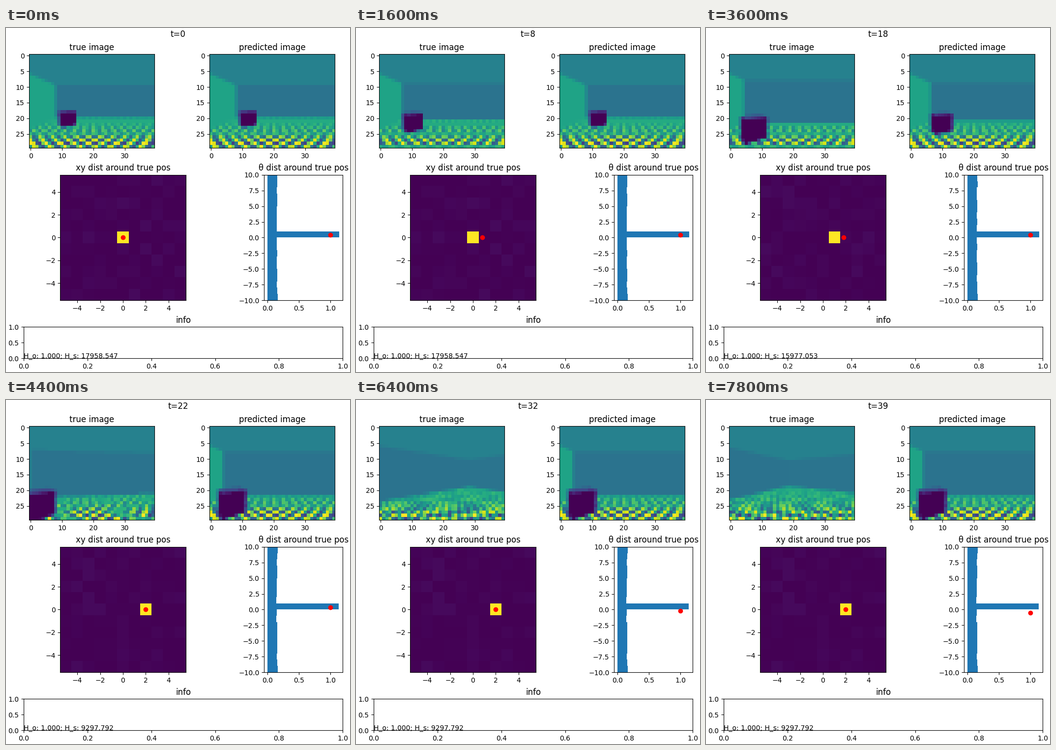
Recreate the animation shown at these times as a matplotlib script. Size 700 by 700 pixels, loop 8000 ms.

```python
import numpy as np
import matplotlib.pyplot as plt
from matplotlib.animation import FuncAnimation

SIZE, STEPS, HOLD = 700, 40, 200
W, H, FOCAL, SUB = 40, 30, 26.0, 4
EYE, CEIL = 1.5, 1.38            # distance from the eye to floor and ceiling
LEFT, RIGHT, FAR = -3.2, 7.5, 7.3
BOX_X, BOX_Z, BOX_HALF, BOX_TOP = -1.55, 5.13, 0.4, 0.65
BOX_TURN = np.radians(40)
TILE = 0.5                       # period of the floor checker
WALK = 20                        # steps forward before turning right


def pose(t):
    """Forward position and heading at step t."""
    return 0.1 * min(t, WALK), np.radians(3) * max(t - WALK, 0)


def rays(n, yaw):
    """World directions for n x n samples in each pixel."""
    u = ((np.arange(W * n) + 0.5) / n - W / 2) / FOCAL
    v = ((np.arange(H * n) + 0.5) / n - H / 2) / FOCAL
    u, v = np.meshgrid(u, v)
    return u * np.cos(yaw) + np.sin(yaw), v, np.cos(yaw) - u * np.sin(yaw)


def slab(pos, d, low, high):
    a, b = (low - pos) / d, (high - pos) / d
    return np.minimum(a, b), np.maximum(a, b)


def floor_shade(z, yaw):
    dx, v, dz = rays(1, yaw)
    depth = EYE / np.maximum(v, 1e-3)
    x, zz = dx * depth, z + dz * depth
    check = np.sin(2 * np.pi * x / TILE) * np.sin(2 * np.pi * zz / TILE)
    fade = np.minimum(1, (2.9 / depth) ** 3)
    return 0.61 + 0.42 * fade * np.clip(1.3 * check, -1, 1)


def view(t):
    z, yaw = pose(t)
    dx, v, dz = rays(SUB, yaw)
    big = 1e6
    with np.errstate(divide="ignore", invalid="ignore"):
        hits = np.stack([
            np.where(dx < 0, LEFT / dx, big),
            np.where(dx > 0, RIGHT / dx, big),
            np.where(dz > 0, (FAR - z) / dz, big),
            np.where(v < 0, -CEIL / v, big),
            np.where(v > 0, EYE / v, big),
        ])
        c, s = np.cos(BOX_TURN), np.sin(BOX_TURN)
        px, pz = -BOX_X, z - BOX_Z
        ax = slab(c * px + s * pz, c * dx + s * dz, -BOX_HALF, BOX_HALF)
        az = slab(c * pz - s * px, c * dz - s * dx, -BOX_HALF, BOX_HALF)
        ay = slab(0, v, BOX_TOP, EYE)
    ground = np.kron(floor_shade(z, yaw), np.ones((SUB, SUB)))
    flat = np.array([0.58, 0.385, 0.38, 0.44, 0])
    near = hits.argmin(0)
    shade = np.where(near == 4, ground, flat[near])

    side = np.maximum(ax[0], az[0])
    enter = np.maximum(side, ay[0])
    leave = np.minimum(np.minimum(ax[1], az[1]), ay[1])
    on_box = (enter < leave) & (enter > 0)
    shade = np.where(on_box, np.where(ay[0] > side, 0.22, 0.0), shade)
    return shade.reshape(H, SUB, W, SUB).mean((1, 3))


def position_map(k):
    rng = np.random.default_rng(5 + k)
    grid = 0.018 * rng.random((11, 11)) ** 2
    grid[rng.integers(0, 11, 8), rng.integers(0, 11, 8)] = 0.024
    grid[5, 5 + k] = 1
    return grid


def heading_bars(k):
    rng = np.random.default_rng(20 + k)
    i = np.arange(20)
    bars = 0.137 + 0.012 * np.abs(i - 9.5) / 9.5 + 0.014 * rng.random(20)
    bars[0] = 0.163
    bars[10] = (1.14, 1.14, 1.133)[k]
    return bars


views = [view(t) for t in range(STEPS)]
maps = [position_map(k) for k in range(3)]
bars = [heading_bars(k) for k in range(3)]
entropy = ("17958.547", "15977.053", "9297.792")

fig = plt.figure(figsize=(SIZE / 100, SIZE / 100), dpi=100)


def panel(x0, y0, x1, y1, title):
    ax = fig.add_axes([x0 / SIZE, 1 - y1 / SIZE, (x1 - x0) / SIZE, (y1 - y0) / SIZE])
    ax.set_title(title)
    return ax


def camera(x0, title):
    ax = panel(x0, 53.1, x0 + 255, 244.3, title)
    im = ax.imshow(views[0], vmin=0, vmax=1, aspect="auto")
    ax.set_xticks(range(0, 40, 10))
    ax.set_yticks(range(0, 30, 5))
    return im


true_im = camera(47.2, "true image")
pred_im = camera(414.2, "predicted image")

ax_xy = panel(110.3, 298.8, 365.6, 554, "xy dist around true pos")
xy_im = ax_xy.imshow(maps[0], vmin=0, vmax=1, origin="lower", aspect="auto",
                     extent=(-5.5, 5.5, -5.5, 5.5))
xy_dot, = ax_xy.plot([0], [0], "ro")
ax_xy.set(xlim=(-5.5, 5.5), ylim=(-5.5, 5.5),
          xticks=range(-4, 5, 2), yticks=range(-4, 5, 2))

ax_th = panel(525.2, 298.8, 685.2, 554, "θ dist around true pos")
th_bars = ax_th.barh(np.arange(-10, 10), bars[0], height=1, align="edge")
th_dot, = ax_th.plot([1], [0.45], "ro")
ax_th.set(xlim=(-0.057, 1.197), ylim=(-10, 10), xticks=(0, 0.5, 1),
          yticks=np.arange(-10, 10.1, 2.5))

ax_info = panel(36.2, 608.2, 685.2, 672.2, "info")
ax_info.set_yticks((0, 0.5, 1))
info = ax_info.text(0, 0, "")
clock = fig.text(0.5, 1 - 4.17 / SIZE, "", ha="center", va="top", fontsize=12)


def draw(t):
    k = min(t // 10, 2)
    z, yaw = pose(t)
    clock.set_text(f"t={t}")
    true_im.set_data(views[t])
    pred_im.set_data(views[10 * k])
    xy_im.set_data(maps[k])
    xy_dot.set_data([z], [0])
    for bar, width in zip(th_bars, bars[k]):
        bar.set_width(width)
    th_dot.set_data([1], [0.45 - yaw])
    info.set_text(f"H_o: 1.000; H_s: {entropy[k]}")
    return []


anim = FuncAnimation(fig, draw, frames=STEPS, interval=HOLD, repeat=True,
                     repeat_delay=0, init_func=lambda: draw(0))
plt.show()
```
